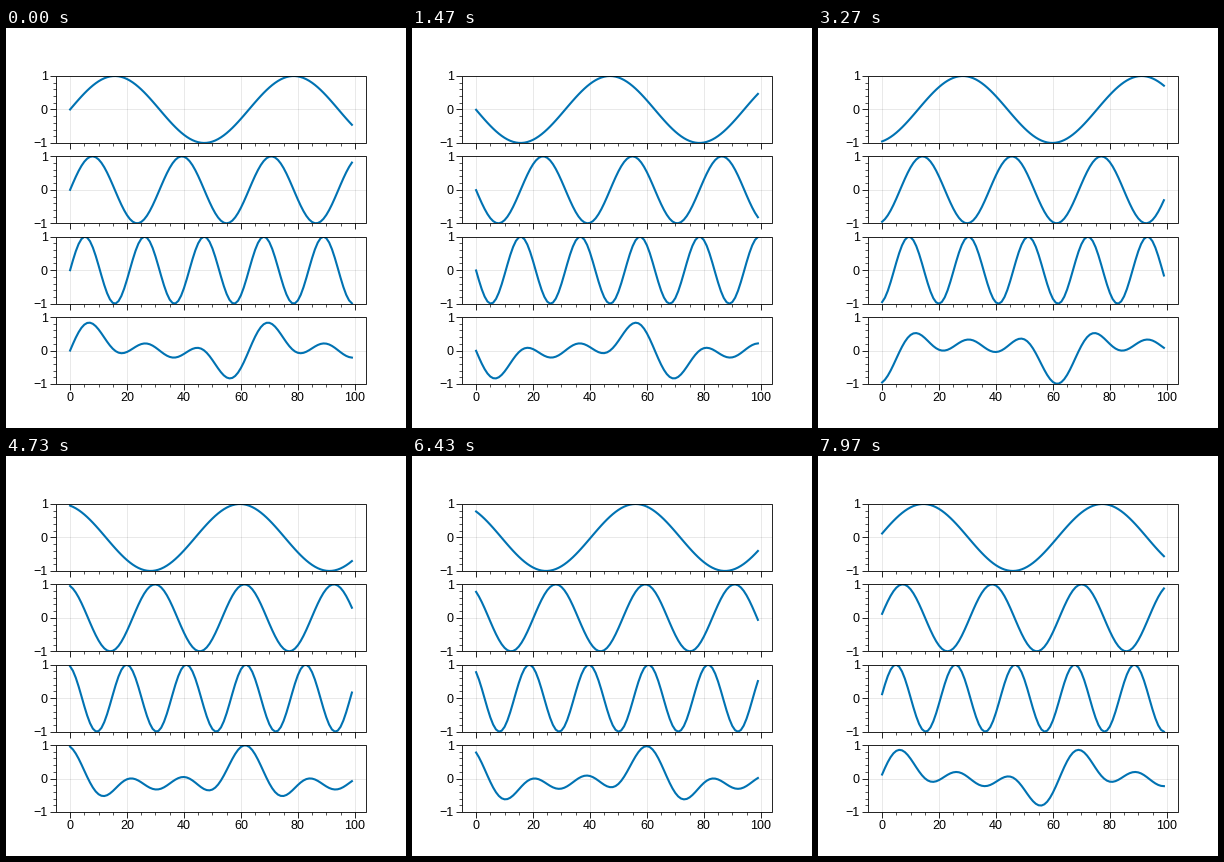
A matplotlib script for the animation above (8 s loop, 400 by 400 pixels).

```python
import numpy as np
import matplotlib.pyplot as plt
from matplotlib import lines as mlines
from matplotlib.animation import FuncAnimation
from matplotlib.patches import Rectangle

SIZE, DPI = 400, 100
TICK_MS = 10            # drawing clock
LOOP_MS = 8000
PHASE_STEP = 0.5
FREQS = (0.1, 0.2, 0.3)

LEFT, WIDTH = 50, 310
BOTTOM, TOP = 44, 352
PANELS = 4
HEIGHT = (TOP - BOTTOM) / (PANELS + 0.2 * (PANELS - 1))
X_MIN, X_MAX = -4.95, 103.95

LINE = 0.6              # frame, tick and grid width in points
PAD = 6 * DPI / 72      # tick length plus label gap in pixels

plt.rcParams["font.family"] = "Liberation Sans"
plt.rcParams["font.size"] = 9

x = np.arange(100)
x_major = np.arange(0, 101, 20)
x_minor = np.array([v for v in range(0, 101, 5) if v % 20])
y_major = np.array([-1, 0, 1])
y_minor = np.array([v / 5 for v in range(-5, 6) if v % 5])


def px(v):
    return LEFT + WIDTH * (v - X_MIN) / (X_MAX - X_MIN)


def base(panel):
    """Bottom edge of a panel, counted from the top."""
    return TOP - HEIGHT * (1 + 1.2 * panel)


def py(v, panel):
    return base(panel) + HEIGHT * (v + 1) / 2


def waves(phase):
    """Three sine waves followed by their mean."""
    parts = [np.sin(f * x + phase) for f in FREQS]
    return parts + [np.mean(parts, axis=0)]


fig = plt.figure(figsize=(SIZE / DPI, SIZE / DPI), dpi=DPI)
ax = fig.add_axes([0, 0, 1, 1])
ax.set_axis_off()


def ticks(xs, ys, marker, length, width):
    xs, ys = np.broadcast_arrays(xs, ys)
    ax.plot(xs.ravel(), ys.ravel(), ls="none", marker=marker, ms=length,
            mew=width, color="black", clip_on=False)


bases = np.array([base(p) for p in range(PANELS)])[:, None]
for xs, ys, length, width in ((x_major, y_major, 4, LINE),
                              (x_minor, y_minor, 2, 0.8 * LINE)):
    ticks(px(xs), bases, mlines.TICKDOWN, length, width)
    ticks(LEFT, [py(ys, p) for p in range(PANELS)],
          mlines.TICKLEFT, length, width)

grid = dict(colors="black", alpha=0.1, linewidths=LINE, zorder=1)
for b in bases[:, 0]:
    ax.vlines(px(x_major), b, b + HEIGHT, **grid)
    ax.hlines(b + HEIGHT * (y_major + 1) / 2, LEFT, LEFT + WIDTH, **grid)

curves = []
for p, y in enumerate(waves(0)):
    frame = ax.add_patch(Rectangle((LEFT, base(p)), WIDTH, HEIGHT, fill=False,
                                   lw=LINE, zorder=2.5))
    curve, = ax.plot(px(x), py(y, p), color="#0072B2", lw=1.5)
    curve.set_clip_path(frame)
    curves.append(curve)
    for v in y_major:
        ax.text(LEFT - PAD, py(v, p), str(v).replace("-", "\u2212"),
                ha="right", va="center_baseline")
for v in x_major:
    ax.text(px(v), BOTTOM - PAD, str(v), ha="center", va="top")

ax.set_xlim(0, SIZE)
ax.set_ylim(0, SIZE)


def update(tick):
    # The picture steps 30 times a second, rounded to the 10 ms clock.
    step = (3 * tick + 1) // 10
    for p, y in enumerate(waves(PHASE_STEP * step)):
        curves[p].set_ydata(py(y, p))
    return curves


anim = FuncAnimation(fig, update, frames=LOOP_MS // TICK_MS, interval=TICK_MS,
                     repeat=True, repeat_delay=0)
plt.show()
```
